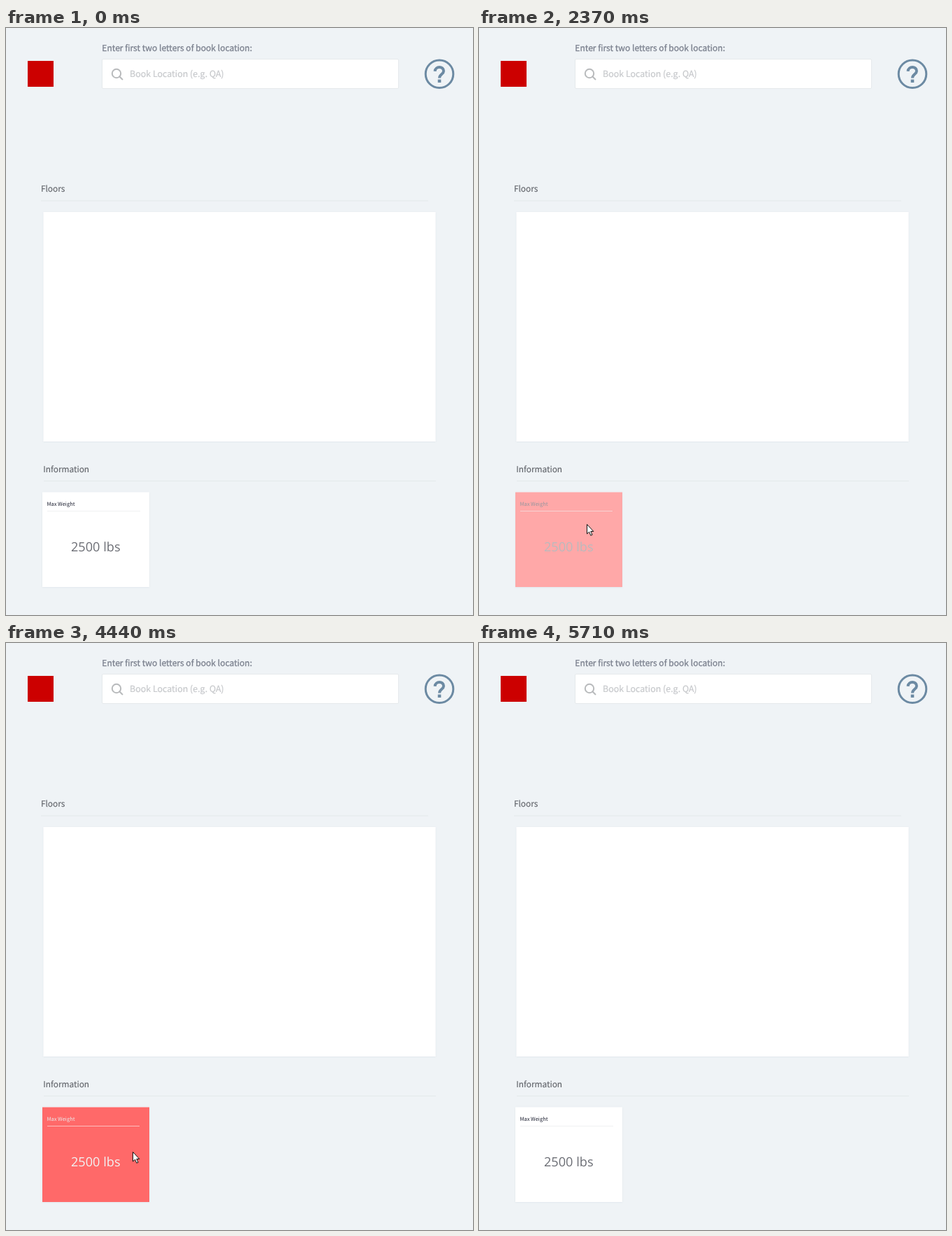
Animation, 668 px wide and 839 px high, one loop 6400 ms. Source, as an HTML page:

```html
<!DOCTYPE html>
<html lang="en">
<head>
<meta charset="utf-8">
<title>Book locator</title>
<style>
html, body { margin: 0; width: 100%; height: 100%; overflow: hidden; background: #eff3f6; }
svg { display: block; width: 668px; height: 839px; }
text { font-family: "Noto Sans CJK JP", "Noto Sans CJK SC", "Noto Sans CJK", "Noto Sans", sans-serif; text-rendering: geometricPrecision; }
.label { font-size: 12.08px; fill: #7b808e; stroke: #7b808e; stroke-width: .3; }
.hint { font-size: 12.45px; fill: #c6c8cb; stroke: #c6c8cb; stroke-width: .2; }
.title { font-size: 11.85px; fill: #62656b; stroke: #62656b; stroke-width: .15; }
.head { font-size: 7.5px; font-weight: 500; }
.value { font-family: "Open Sans", "Noto Sans", sans-serif; font-size: 18.15px; }
.rule { fill: #e4e9eb; }
</style>
</head>
<body>
<svg viewBox="0 0 668 839">
  <defs>
    <filter id="soft" x="-5%" y="-5%" width="110%" height="110%">
      <feDropShadow dx="0" dy="0.6" stdDeviation=".8" flood-color="#8a9aa6" flood-opacity=".16"/>
    </filter>
  </defs>
  <rect width="668" height="839" fill="#eff3f6"/>

  <rect x="31" y="47" width="37" height="37" fill="#cc0000"/>
  <text class="label" x="137.3" y="33.1">Enter first two letters of book location:</text>
  <rect x="137.5" y="44.5" width="424" height="42" rx="1.5" fill="#fff" stroke="#e5e9ec"/>
  <g fill="none" stroke="#b8babc" stroke-width="2">
    <circle cx="158" cy="65" r="6.2"/>
    <path d="M162.5 69.5L167 74"/>
  </g>
  <text class="hint" x="177" y="70.3">Book Location (e.g. QA)</text>

  <g fill="none" stroke="#6c8aa3">
    <circle cx="620" cy="65.8" r="19.8" stroke-width="3"/>
    <path stroke-width="4" d="M613.6 61.8C614 54.2 626 54.2 626 61.4C626 66 620 66 620 71.4"/>
    <path stroke-width="4.6" d="M620 73.6V78"/>
  </g>

  <text class="title" x="49.9" y="234.2">Floors</text>
  <rect class="rule" x="50" y="246.5" width="554" height="1"/>
  <rect x="53.5" y="263" width="561" height="328" fill="#fff" filter="url(#soft)"/>
  <text class="title" x="53.3" y="635.1">Information</text>
  <rect class="rule" x="54" y="647" width="561" height="1"/>

  <g id="plain">
    <rect x="52" y="663.5" width="153" height="135.5" fill="#fff" filter="url(#soft)"/>
    <text class="head" x="58.4" y="682.5" fill="#1f2233">Max Weight</text>
    <rect x="59" y="690" width="133" height="1" fill="#eff1f2"/>
    <text class="value" x="93" y="747.5" fill="#6c6e75">2500 lbs</text>
  </g>
  <g id="active" opacity="0">
    <rect x="52" y="663.5" width="153" height="135.5" fill="#ff5b5b"/>
    <text class="head" x="58.4" y="682.5" fill="#fff">Max Weight</text>
    <rect x="59" y="690" width="132" height="1" fill="#ffb8b8"/>
    <text class="value" x="93" y="747.5" fill="#fff">2500 lbs</text>
  </g>

  <circle id="press" r="10.5" fill="#fff86b"/>
  <g id="cursor" stroke="#111" fill="#fff" stroke-linejoin="round">
    <path id="arrow" d="M.5 .5V14L3.6 11.2 5.8 16.3 8 15.4 5.8 10.5H9.8Z"/>
    <g id="hand">
      <path transform="translate(-5 0)" d="M4.5 9.6V1.6C4.5 .1 6.6 .1 6.6 1.6V5.6C6.9 4.5 9 4.7 9.1 6 9.6 5 11.4 5.3 11.5 6.6 12.3 5.8 13.7 6.3 13.7 7.6V11C13.7 12.5 12.6 13 12.6 15.4H5.6C5.4 13.5 2.5 11 1 8.9 .2 7.6 1.8 6.6 2.9 7.8Z"/>
      <path transform="translate(-5 0)" fill="none" stroke-width=".8" d="M6.6 5.6V8.6M9.1 6V8.8M11.5 6.6V9"/>
    </g>
  </g>
</svg>
<script>
const LOOP = 6400;
const el = id => document.getElementById(id);
const show = (id, on) => el(id).setAttribute("display", on ? "inline" : "none");
const clamp = x => Math.max(0, Math.min(1, x));
const easeOut = x => 1 - (1 - x) ** 2;
const linear = x => x;
const smooth = x => x * x * (3 - 2 * x);
const ramp = (t, from, to) => easeOut(clamp((t - from) / (to - from)));

// Screen refreshes: first time, last time, count
const bursts = [
  [100, 710, 9], [810, 980, 3], [1270, 1590, 5], [2040, 2530, 7], [2690, 2740, 2],
  [2920, 3060, 3], [3300, 3300, 1], [3610, 3980, 6], [4300, 4300, 1],
  [4440, 5080, 9], [5160, 5710, 8]
];

// Pointer legs: start, end, from, to, easing
const legs = [
  [100, 710, [542, 830], [188, 732], easeOut],
  [725, 980, [188, 732], [159, 728], easeOut],
  [1190, 1590, [159, 728], [154, 709], smooth],
  [2850, 3060, [154, 709], [215, 738], easeOut],
  [3290, 3300, [215, 738], [215, 740], linear],
  [3536, 3980, [215, 740], [181, 727], easeOut],
  [4520, 4760, [181, 727], [197, 733], x => x * x],
  [4760, 5080, [197, 733], [468, 813], x => x ** 1.5],
  [5080, 5160, [468, 813], [556, 836], linear]
];

function lastRefresh(t) {
  let held = 0;
  for (const [from, to, n] of bursts) {
    if (t < from) break;
    const step = n > 1 ? (to - from) / (n - 1) : 1;
    for (let i = 0; i < n; i++) {
      const at = Math.round((from + i * step) / 10) * 10;
      if (at <= t) held = at;
    }
  }
  return held;
}

function pointerAt(t) {
  let leg = legs[0];
  for (const next of legs) if (t >= next[0]) leg = next;
  const [start, end, a, b, ease] = leg;
  const k = ease(clamp((t - start) / (end - start)));
  return a.map((v, i) => Math.round(v + (b[i] - v) * k));
}

function draw(time) {
  const t = lastRefresh(time);
  const [x, y] = pointerAt(t);
  const overCard = x >= 52 && x < 205 && y >= 663 && y < 799;
  const released = (t >= 2200 && t < 2920) || t >= 4440;
  const hand = overCard && !released;
  const pressed = (t >= 2040 && t < 2200) || (t >= 4300 && t < 4440);

  el("active").setAttribute("opacity", ramp(t, 2215, 2715) - ramp(t, 4405, 5150));
  el("cursor").setAttribute("transform", `translate(${x} ${y})`);
  el("press").setAttribute("cx", x - 0.5);
  el("press").setAttribute("cy", y);
  show("press", pressed);
  show("cursor", t >= 100 && t < 5200);
  show("hand", hand);
  show("arrow", !hand);
}

const origin = performance.now();
function tick() {
  draw((performance.now() - origin) % LOOP);
  requestAnimationFrame(tick);
}
tick();
</script>
</body>
</html>
```
